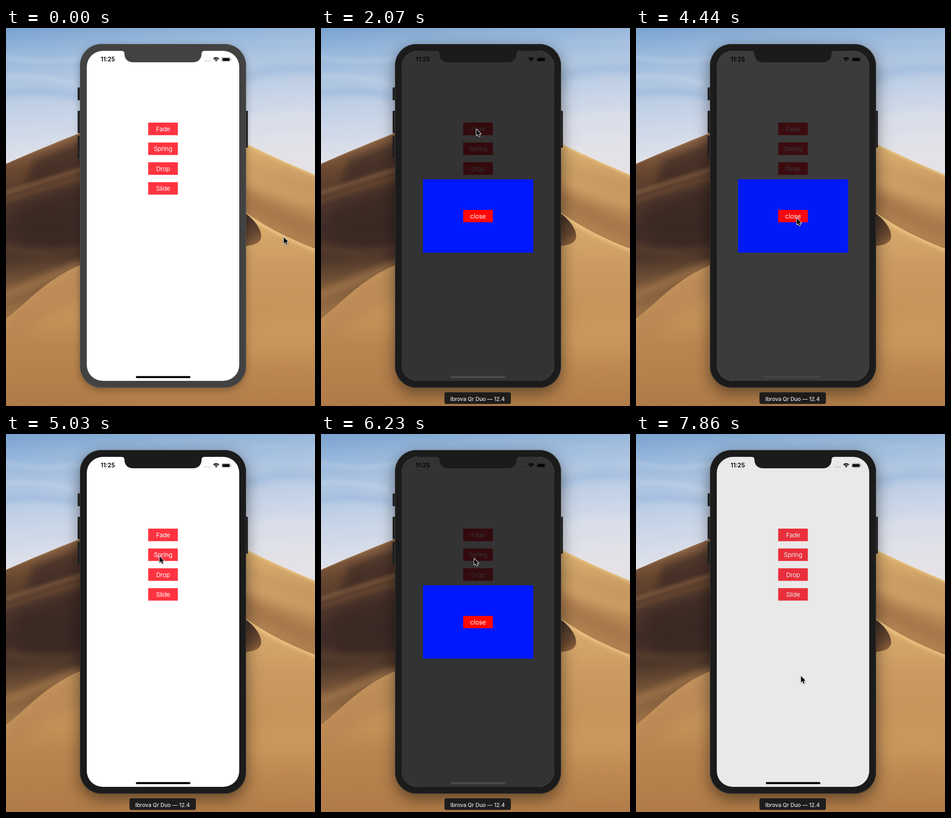
Recreate the animation shown at these times as an HTML page with a canvas. Size 677 px wide and 827 px high, loop 8000 ms.

```html
<!DOCTYPE html>
<html lang="en">
<head>
<meta charset="utf-8">
<title>Modal transitions</title>
<style>
html, body { margin: 0; width: 100%; height: 100%; overflow: hidden; }
canvas { display: block; width: 677px; height: 827px; }
</style>
</head>
<body>
<canvas id="stage" width="677" height="827"></canvas>
<script>
const W = 677, H = 827, LOOP = 8000, TICK = 148.15;
const canvas = document.getElementById('stage');
const ctx = canvas.getContext('2d');
const FONT = 'Inter, "Open Sans", sans-serif';

const clamp = v => Math.max(0, Math.min(1, v));
const smooth = v => v * v * (3 - 2 * v);

function gradient(c, x0, y0, x1, y1, ...stops) {
  const g = c.createLinearGradient(x0, y0, x1, y1);
  stops.forEach(([at, color]) => g.addColorStop(at, color));
  return g;
}

function shape(c, path, fill, blur = 0) {
  c.save();
  if (blur) c.filter = `blur(${blur}px)`;
  c.fillStyle = fill;
  c.fill(new Path2D(path));
  c.restore();
}

function line(c, path, color, width, blur) {
  c.save();
  if (blur) c.filter = `blur(${blur}px)`;
  c.strokeStyle = color;
  c.lineWidth = width;
  c.stroke(new Path2D(path));
  c.restore();
}

function box(c, x, y, w, h, r, fill) {
  c.beginPath();
  c.roundRect(x, y, w, h, r);
  c.fillStyle = fill;
  c.fill();
}

function text(c, str, x, y, size, color, weight = 400, spacing = 0) {
  c.font = `${weight} ${size}px ${FONT}`;
  c.letterSpacing = spacing + 'px';
  c.textAlign = 'center';
  c.fillStyle = color;
  c.fillText(str, x, y);
}

// Desert scenery
function paintSky(c) {
  c.fillStyle = gradient(c, 0, 0, 30, 330, [0, '#79a3cf'], [0.15, '#94b5da'],
    [0.36, '#afc6e2'], [0.62, '#c9d5e8'], [0.88, '#dfe1e9'], [1, '#e4e2e6']);
  c.fillRect(0, 0, W, 340);
  line(c, 'M-10 62 Q70 80 165 66', 'rgba(200,216,236,.4)', 9, 5);
  line(c, 'M-10 108 Q60 98 150 122', 'rgba(205,220,238,.5)', 7, 4);
  line(c, 'M-10 145 Q70 130 165 150', 'rgba(130,168,212,.4)', 14, 7);
  line(c, 'M520 110 Q590 80 690 92', 'rgba(130,165,208,.35)', 18, 8);
  line(c, 'M520 215 Q600 180 690 200', 'rgba(226,227,235,.45)', 26, 9);
  line(c, 'M540 32 Q610 20 690 34', 'rgba(175,200,228,.4)', 8, 5);
}

function paintLeftDune(c) {
  const dune = 'M0 297 C60 271 110 250 164 229 L200 220 V640 H0Z';
  c.save();
  c.clip(new Path2D(dune));
  shape(c, dune, gradient(c, 30, 270, 70, 620, [0, '#835d40'], [0.12, '#68472f'],
    [0.28, '#51382c'], [0.48, '#3f2c27'], [0.66, '#4d362a'], [0.82, '#795638'], [1, '#9b7147']));
  line(c, 'M-10 298 C60 272 110 251 170 227', '#9a7049', 5, 2);
  shape(c, 'M60 290 L180 240 V310 L40 350Z', 'rgba(59,41,36,.7)', 9);
  line(c, 'M-10 364 C50 345 90 333 170 308', 'rgba(151,108,72,.75)', 7, 4);
  line(c, 'M-10 382 C50 360 100 346 170 326', 'rgba(113,79,55,.7)', 9, 5);
  shape(c, 'M20 395 L180 335 V500 L30 475Z', 'rgba(56,39,35,.7)', 13);
  line(c, 'M-10 480 C50 492 90 500 170 482', 'rgba(104,73,51,.6)', 13, 8);
  line(c, 'M-10 586 C45 570 80 548 170 518', 'rgba(169,124,77,.7)', 18, 8);
  c.restore();
}

function paintSand(c) {
  const far = 'M500 242 L526 253 C575 277 628 301 677 321 V560 H500Z';
  c.save();
  c.clip(new Path2D(far));
  shape(c, far, gradient(c, 580, 265, 545, 460, [0, '#deb16f'], [0.22, '#cda066'],
    [0.6, '#b88856'], [1, '#af804f']));
  line(c, 'M515 247 C570 273 625 299 690 326', '#edc884', 7, 3);
  line(c, 'M520 325 Q600 360 690 385', 'rgba(218,171,108,.55)', 26, 12);
  shape(c, 'M520 350 C580 385 630 410 690 430 V470 L520 398Z', 'rgba(157,110,70,.55)', 10);
  c.restore();

  const near = 'M0 636 C48 600 82 553 164 518 L350 460 L526 404 C572 437 621 461 677 483 V827 H0Z';
  c.save();
  c.clip(new Path2D(near));
  shape(c, near, gradient(c, 0, 420, 0, 827, [0, '#d9ac6c'], [0.25, '#cb9a61'],
    [0.55, '#c59258'], [0.8, '#bd8951'], [1, '#b17c48']));
  shape(c, 'M0 636 C48 600 82 553 170 515 V600 Q80 615 0 710Z', 'rgba(181,132,84,.6)', 12);
  shape(c, 'M-20 690 Q90 650 230 690 V850 H-20Z', 'rgba(173,121,70,.4)', 25);
  line(c, 'M515 398 C570 437 621 461 690 488', '#efca86', 9, 4);
  shape(c, 'M520 655 Q600 615 700 635 V720 Q600 690 520 730Z', 'rgba(214,166,105,.35)', 22);
  c.restore();

  shape(c, 'M520 402 C541 416 560 438 559 457 C557 473 540 475 520 478Z',
    gradient(c, 528, 420, 554, 478, [0, '#49342a'], [0.55, '#684830'], [1, '#96693f']), 0.7);
}

function phoneBody(c, active) {
  const edge = active ? '#1b1b1b' : '#424242';
  const side = gradient(c, 157, 0, 163, 0, [0, '#1d1d1f'], [1, '#39393b']);
  [[130, 28], [181, 49], [236, 49]].forEach(([y, h]) => box(c, 157, y, 7, h, 1.5, side));
  box(c, 523, 181, 7, 81, 1.5, '#2a2a2c');
  c.save();
  c.shadowColor = active ? 'rgba(0,0,0,.48)' : 'rgba(0,0,0,.3)';
  c.shadowBlur = active ? 34 : 16;
  c.shadowOffsetY = active ? 11 : 5;
  box(c, 162, 35, 364, 752, 47, edge);
  c.restore();
  c.beginPath();
  c.roundRect(162.5, 35.5, 363, 751, 47);
  c.lineWidth = 1;
  c.strokeStyle = active ? '#3a3836' : '#565452';
  c.stroke();
}

function makeBackdrop(active) {
  const layer = document.createElement('canvas');
  layer.width = W;
  layer.height = H;
  const c = layer.getContext('2d');
  paintSky(c);
  paintLeftDune(c);
  paintSand(c);
  phoneBody(c, active);
  return layer;
}

const idle = makeBackdrop(false), focused = makeBackdrop(true);

function statusBar() {
  text(ctx, '11:25', 223, 73.3, 13, '#000', 600);
  for (let i = 0; i < 4; i++) {
    ctx.beginPath();
    ctx.arc(435.8 + i * 4, 72, 1.25, 0, 7);
    ctx.fillStyle = '#c4c4c4';
    ctx.fill();
  }
  ctx.strokeStyle = '#000';
  ctx.lineWidth = 1.9;
  [8.3, 5.3].forEach(r => {
    ctx.beginPath();
    ctx.arc(460.5, 73, r, -Math.PI * 0.76, -Math.PI * 0.24);
    ctx.stroke();
  });
  shape(ctx, 'M460.5 73.4 L458.2 71 Q460.5 69 462.8 71Z', '#000');
  ctx.beginPath();
  ctx.roundRect(472.5, 64.2, 19, 9.2, 2.4);
  ctx.lineWidth = 0.9;
  ctx.strokeStyle = '#9a9a9a';
  ctx.stroke();
  box(ctx, 474, 65.7, 16, 6.2, 1.2, '#000');
  box(ctx, 492.6, 67.2, 1.2, 3.2, 0.6, '#9a9a9a');
}

function modal(alpha, scale) {
  ctx.save();
  ctx.globalAlpha = alpha;
  ctx.fillStyle = 'rgba(0,0,0,.8)';
  ctx.fillRect(177, 50, 334, 722);
  ctx.translate(344, 411.5);
  ctx.scale(scale, scale);
  ctx.translate(-344, -411.5);
  box(ctx, 223.5, 331, 241.5, 160.5, 0, '#0018ff');
  box(ctx, 311.5, 398, 65, 27, 0, '#ff0805');
  text(ctx, 'close', 344, 416.5, 14, '#fff', 400, -0.1);
  ctx.restore();
}

function screen(alpha, scale, active) {
  ctx.save();
  ctx.beginPath();
  ctx.roundRect(177, 50, 334, 722, 35);
  ctx.clip();
  ctx.fillStyle = '#fff';
  ctx.fillRect(177, 50, 334, 722);
  statusBar();
  ['Fade', 'Spring', 'Drop', 'Slide'].forEach((name, i) => {
    const y = 207 + i * 43.4;
    box(ctx, 311.5, y, 65, 27.4, 0, '#ff3340');
    text(ctx, name, 344, y + 18.7, 13.7, '#fff', 400, -0.3);
  });
  if (alpha > 0) modal(alpha, scale);
  const tone = Math.round(75 * clamp(alpha * 1.6 - 0.6));
  box(ctx, 284.5, 761.5, 119.5, 4.4, 2.2, `rgb(${tone},${tone},${tone})`);
  ctx.restore();
  shape(ctx, 'M253 49 V50 Q259.5 50 259.5 56 C259.5 68 267 75 279 75 H409 C421 75 428.5 68 428.5 56 Q428.5 50 435 50 V49Z',
    active ? '#1b1b1b' : '#424242');
}

// Pointer stops: tick, x, y
const path = [
  [1, 608, 457], [3, 560, 390], [5, 478, 296], [7, 385, 203], [8, 354, 185], [9, 343, 202],
  [10, 340, 221], [17, 340, 221], [19, 341, 250], [22, 346, 355], [24, 351, 407],
  [26, 352, 416], [30, 352, 416], [31, 350, 392], [33, 339, 290], [34, 336, 267],
  [41, 336, 267], [42, 335, 272], [44, 341, 335], [47, 356, 485], [49, 361, 529]
];

function pointerAt(k) {
  const i = path.findIndex(p => p[0] >= k);
  if (i < 0) return path[path.length - 1].slice(1);
  if (i === 0) return path[0].slice(1);
  const a = path[i - 1], b = path[i], u = (k - a[0]) / (b[0] - a[0]);
  return [a[1] + (b[1] - a[1]) * u, a[2] + (b[2] - a[2]) * u];
}

function pointer(x, y) {
  const arrow = new Path2D('M0 0 V14 L3.2 11 L5.5 16.2 L7.8 15.2 L5.6 10.2 H10Z');
  ctx.save();
  ctx.translate(x + 0.5, y + 0.5);
  ctx.lineJoin = 'round';
  ctx.lineWidth = 2;
  ctx.strokeStyle = '#fff';
  ctx.shadowColor = 'rgba(0,0,0,.4)';
  ctx.shadowBlur = 2.5;
  ctx.shadowOffsetY = 1;
  ctx.stroke(arrow);
  ctx.shadowColor = 'transparent';
  ctx.fillStyle = '#000';
  ctx.fill(arrow);
  ctx.restore();
}

function modalState(k) {
  const span = (start, len) => clamp((k - start) / len);
  if (k < 35) return [smooth(span(11, 3)) - smooth(span(29.6, 3.4)), 1];
  const enter = span(36, 3), leave = span(50.29, 3.4);
  const spring = 1 - Math.pow(1 - enter, 2) * Math.cos(enter * 4);
  return [smooth(enter) - smooth(leave), leave > 0 ? Math.max(0, 1 - 1.3 * leave) : spring];
}

function render(t) {
  const k = Math.floor((t + 8) / TICK);
  const active = k >= 10;
  ctx.drawImage(active ? focused : idle, 0, 0);
  screen(...modalState(k), active);
  if (k >= 5) {
    box(ctx, 270.5, 797, 145.5, 25.5, 4, '#1e1d1c');
    text(ctx, 'Ibrova Qr Duo — 12.4', 343, 815.5, 11.8, '#e4e4e4', 500);
  }
  pointer(...pointerAt(k));
}

const begin = performance.now();
function loop() {
  render((performance.now() - begin) % LOOP);
  requestAnimationFrame(loop);
}
loop();
</script>
</body>
</html>
```
